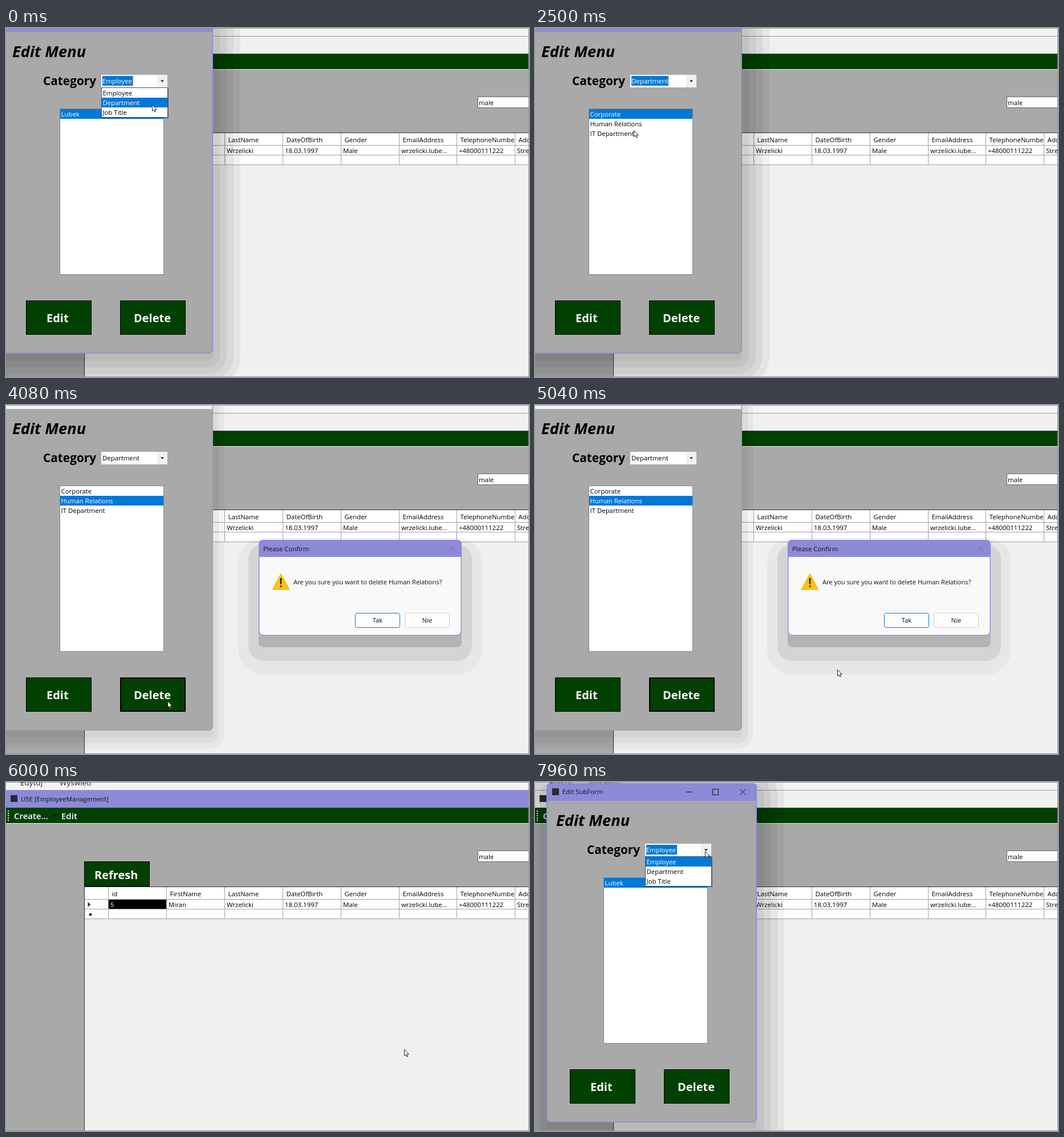
Recreate the animation shown at these times as an HTML page. Size 917 by 611 pixels, loop 8000 ms.

```html
<!DOCTYPE html>
<html lang="en">
<head>
<meta charset="utf-8">
<title>Edit menu</title>
<style>
  html, body { margin: 0; width: 100%; height: 100%; overflow: hidden; background: #f0f0f0; }
  svg { display: block; width: 917px; height: 611px; }
  text { font: 11.4px "Open Sans", "Noto Sans", sans-serif; white-space: pre; }
  .head { font-weight: 700; font-size: 20px; }
  .title { font-weight: 700; font-size: 27.2px; font-style: italic; }
  .label { font-weight: 700; font-size: 20.8px; }
  .tool { font-weight: 600; font-size: 15px; }
  .strip { font-size: 13.5px; }
  .ask { font-size: 11.1px; }
</style>
</head>
<body>
<svg viewBox="0 0 917 611" xmlns="http://www.w3.org/2000/svg">
  <g id="main"></g>
  <g id="menu"></g>
  <g id="dialog"></g>
  <path id="cursor" d="M.5 .5V11.5L3 9.2L4.8 13L6.6 12.2L4.9 8.5H8.3Z" fill="#fff" stroke="#111" stroke-width=".9"/>
  <path d="M0 .5H916.5V610.5H0" fill="none" stroke="#9a9a9a"/>
</svg>
<script>
const LOOP = 8000;
const GREEN = '#004000', GRAY = '#a9a9a9', PURPLE = '#8d8ad8', BLUE = '#0078d7', LIGHT = '#f0f0f0';

// Moments of the clicks, in ms
const PICK_UNIT = 1480, PICK_ROW = 2760, DELETE = 3960, CONFIRM = 5520, EDIT = 7020, DROP = 7820;
const REOPEN = 5800; // from here on the menu is a fresh one, lower right

const $ = id => document.getElementById(id);

const rect = (x, y, w, h, fill, extra = '') =>
  `<rect x="${x}" y="${y}" width="${w}" height="${h}" fill="${fill}" ${extra}/>`;
const box = (x, y, w, h, fill, stroke, sw = 1, r = 0) =>
  rect(x + sw / 2, y + sw / 2, w - sw, h - sw, fill, `stroke="${stroke}" stroke-width="${sw}" rx="${r}"`);
const text = (x, y, str, fill = '#000', cls = '', anchor = 'start') =>
  `<text x="${x}" y="${y}" fill="${fill}" class="${cls}" text-anchor="${anchor}">${str}</text>`;
const line = (d, stroke, extra = '') => `<path d="${d}" fill="none" stroke="${stroke}" ${extra}/>`;
const repeat = (n, f) => Array.from({ length: n }, (_, i) => f(i)).join('');

// Stepped soft shadow: rounded rectangles that grow, sink and fade
const shadow = (x, y, w, h, { n, grow, dy, sink = 0, alpha, fade = 1 }) => repeat(n, i => {
  const d = grow * i;
  return rect(x - d, y - d + dy + sink * i, w + 2 * d, h + 2 * d, '#000',
    `fill-opacity="${alpha * fade ** i}" rx="${d + 8}"`);
});

function mainWindow(active) {
  const heads = ['id', 'FirstName', 'LastName', 'DateOfBirth', 'Gender', 'EmailAddress', 'TelephoneNumbe', 'Address'];
  const cells = ['5', 'Miran', 'Wrzelicki', '18.03.1997', 'Male', 'wrzelicki.lube...', '+48000111222', 'Street'];
  const col = i => 179 + Math.round(i * 101.9);
  const grid = repeat(3, i => `M138 ${205.5 + 17 * i}H917`) + repeat(8, i => `M${col(i) + .5} 184V239`);
  return rect(0, 0, 917, 15, '#f3f3f3') +
    text(25, 6, 'Edytuj', '#222', 'strip') + text(94, 6, 'Wyświetl', '#222', 'strip') +
    rect(0, 14, 917, 31, active ? PURPLE : LIGHT) +
    (active ? '' : line('M0 14.5H917', '#9c9c9c')) +
    rect(8, 23, 12, 12, '#2b2b2b') +
    text(26, 34, 'USE [EmployeeManagement]', active ? '#111' : '#8a8a8a') +
    rect(0, 45, 917, 27, GREEN) + rect(0, 72, 917, 1, '#f4f4f4') +
    line('M4 50V68', '#fff', 'stroke-width="2" stroke-dasharray="2 2"') +
    text(14, 65, 'Create...', '#fff', 'tool') + text(97, 65, 'Edit', '#fff', 'tool') +
    '<path d="M82 58H88L85 61Z" fill="#111"/>' +
    rect(0, 73, 917, 538, GRAY) +
    box(827, 120, 100, 20, '#fff', '#6a6a6a') + text(829, 134.5, 'male') +
    rect(138, 183, 779, 428, LIGHT) + rect(138, 184, 779, 55, '#fff') +
    line(grid, '#a0a0a0') + line('M137.5 611V183.5H917', '#303030') +
    rect(180, 206, 101, 16, '#000') +
    heads.map((h, i) => text(col(i) + 6.5, 199.5, h)).join('') +
    cells.map((c, i) => text(col(i) + 4, 219, c, i ? '#000' : '#fff')).join('') +
    '<path d="M143.5 210V219L148.5 214.5Z" fill="#333"/><circle cx="148" cy="232" r="2.5" fill="#333"/>' +
    box(137, 139, 115, 44, GREEN, '#000') + text(155, 170, 'Refresh', '#fff', 'head');
}

const KINDS = ['Employee', 'Department', 'Job Title'];
const ENTRIES = [['Lubek'], ['Corporate', 'Human Relations', 'IT Department']];

const rows = (items, picked, x, y, w) => items.map((s, i) =>
  (i === picked ? rect(x, y + 17 * i, w, 17, BLUE) : '') +
  text(x + 1.5, y + 13.3 + 17 * i, s, i === picked ? '#fff' : '#000')).join('');

function menuWindow({ active, deep, kind, marked, open, pick, focus, caret }) {
  const button = (x, tx, label) => box(x, 477, 115, 60, GREEN, '#000', focus === label ? 2 : 1) +
    text(tx, 515, label, '#fff', 'head');
  return shadow(-6, -24, 369, 594, { n: deep ? 5 : 3, grow: deep ? 12 : 10, dy: 12, alpha: deep ? .05 : .045 }) +
    rect(-6, -24, 369, 594, GRAY, 'rx="8"') +
    `<path d="M-6 7V-16Q-6 -24 2 -24H355Q363 -24 363 -16V7Z" fill="${active ? PURPLE : '#f3f3f3'}"/>` +
    box(-6, -24, 369, 594, 'none', active ? PURPLE : '#a0a0a0', 1.5, 8) +
    rect(4, -15, 12, 12, '#2b2b2b') + text(22, -5, 'Edit SubForm', '#111') +
    line('M239 -8.5h11m35.5 -5h10v10h-10zm48 0l10 10m0 -10l-10 10', '#111') +
    text(11, 51, 'Edit Menu', '#000', 'title') + text(65, 100, 'Category', '#000', 'label') +
    box(94, 141, 183, 291, '#fff', '#828790') + rows(ENTRIES[kind], pick, 95, 142, 181) +
    rect(167, 82, 116, 22, '#fff') + rect(265, 82, 18, 22, LIGHT) +
    '<path d="M271 91.5H277L274 94.8Z" fill="#111"/>' +
    (marked ? rect(169, 84, kind ? 65 : 54, 17, BLUE) : '') +
    text(169, 97, KINDS[kind], marked ? '#fff' : '#000') +
    (caret ? rect(222, 83, 1, 18, '#ff8728') : '') +
    (open < 0 ? '' : rect(169, 106, 116, 52, '#000', 'fill-opacity=".4"') +
      box(167, 104, 117, 53, '#fff', '#1c5c96') + rows(KINDS, open, 168, 105, 115)) +
    button(35, 71, 'Edit') + button(200, 224, 'Delete');
}

function dialogBox(closing) {
  const button = (x, label, stroke) => box(x, 364, 79, 26, '#fdfdfd', stroke, 1, 3) +
    text(x + 39.5, 381, label, '#111', '', 'middle');
  return shadow(443, 236, 356, 168, { n: 3, grow: 18, dy: 20, sink: 6, alpha: .16, fade: .5 }) +
    rect(443, 236, 356, 168, '#f9f9f9', 'rx="8"') +
    `<path d="M443 266V244Q443 236 451 236H791Q799 236 799 244V266Z" fill="${PURPLE}"/>` +
    box(443, 236, 356, 168, 'none', PURPLE, 1.5, 8) +
    text(451, 256, 'Please Confirm', '#111') +
    line('M776.5 246.5l10 10m0 -10l-10 10', closing ? '#222' : '#6c69a6') +
    '<path d="M482 297L495.500 322.500H468.500Z" fill="#fdc10f" stroke="#fdc10f" stroke-width="3" stroke-linejoin="round"/>' +
    '<path d="M480.5 303h3l-.5 11h-2Z" fill="#222"/><circle cx="482" cy="317.5" r="1.6" fill="#222"/>' +
    text(504, 313.5, 'Are you sure you want to delete Human Relations?', '#111', 'ask') +
    button(612, 'Tak', BLUE) + button(699, 'Nie', '#d0d0d0');
}

const ramp = (t, a, b) => Math.min(1, Math.max(0, (t - a) / (b - a)));
const smooth = f => f * f * (3 - 2 * f);

// Each glide of the pointer: start, end, where it stops
const GLIDES = [
  [0, 190, 246, 135], [1560, 2130, 170, 184], [2320, PICK_ROW, 177, 170],
  [3050, 3650, 328, 570], [3840, DELETE, 283, 518], [4200, 4680, 408, 551], [4680, 5400, 650, 376],
  [5880, 6120, 744, 558], [6150, 6780, 113, 55], [7140, 7780, 298, 121]
];

function pointer(t) {
  let x = 256, y = 134;
  for (const [a, b, toX, toY] of GLIDES) {
    const f = smooth(ramp(t, a, b));
    x += (toX - x) * f;
    y += (toY - y) * f;
  }
  return [Math.round(x), Math.round(y)];
}

function menuState(t) {
  const fresh = t >= REOPEN;
  return {
    active: t < DELETE || t >= CONFIRM,
    deep: t < DELETE || fresh,
    kind: +(t >= PICK_UNIT && !fresh),
    marked: t < PICK_ROW || t >= DROP,
    open: t < PICK_UNIT ? 1 : t >= DROP ? 0 : -1,
    pick: +(t >= PICK_ROW && !fresh),
    focus: fresh ? (t < DROP ? 'Edit' : '') : t >= DELETE ? 'Delete' : '',
    caret: t < PICK_UNIT && Math.floor((t + 120) / 490) % 2 === 0
  };
}

// Scale and opacity of the windows as they open and close
function menuPose(t) {
  if (t >= REOPEN) {
    const rest = 1 - ramp(t, EDIT, EDIT + 120);
    return [1 - .1 * rest, 1 - rest ** 4];
  }
  const out = ramp(t, CONFIRM, CONFIRM + 160) ** 2;
  return [1 - .05 * out, 1 - out];
}

function dialogPose(t) {
  const into = ramp(t, DELETE, DELETE + 120), out = ramp(t, CONFIRM, CONFIRM + 120);
  return [.92 + .08 * into - .04 * out, into - out];
}

const drawn = {};
function redraw(id, make, state) {
  const key = JSON.stringify(state);
  if (drawn[id] === key) return;
  drawn[id] = key;
  $(id).innerHTML = make(state);
}

function pose(id, [scale, opacity], ox, oy, shift = 0) {
  const g = $(id);
  g.setAttribute('transform', `translate(${ox + shift} ${oy + shift}) scale(${scale}) translate(${-ox} ${-oy})`);
  g.setAttribute('opacity', opacity);
  g.style.display = opacity > 0 ? '' : 'none';
}

function render(t) {
  redraw('main', mainWindow, t >= CONFIRM && t < EDIT);
  redraw('menu', menuWindow, menuState(t));
  redraw('dialog', dialogBox, t >= CONFIRM);
  pose('menu', menuPose(t), 113, 260, t >= REOPEN ? 26 : 0);
  pose('dialog', dialogPose(t), 600, 315);
  $('cursor').setAttribute('transform', `translate(${pointer(t)})`);
}

const start = performance.now();
function tick() {
  render((performance.now() - start) % LOOP);
  requestAnimationFrame(tick);
}
tick();
</script>
</body>
</html>
```
